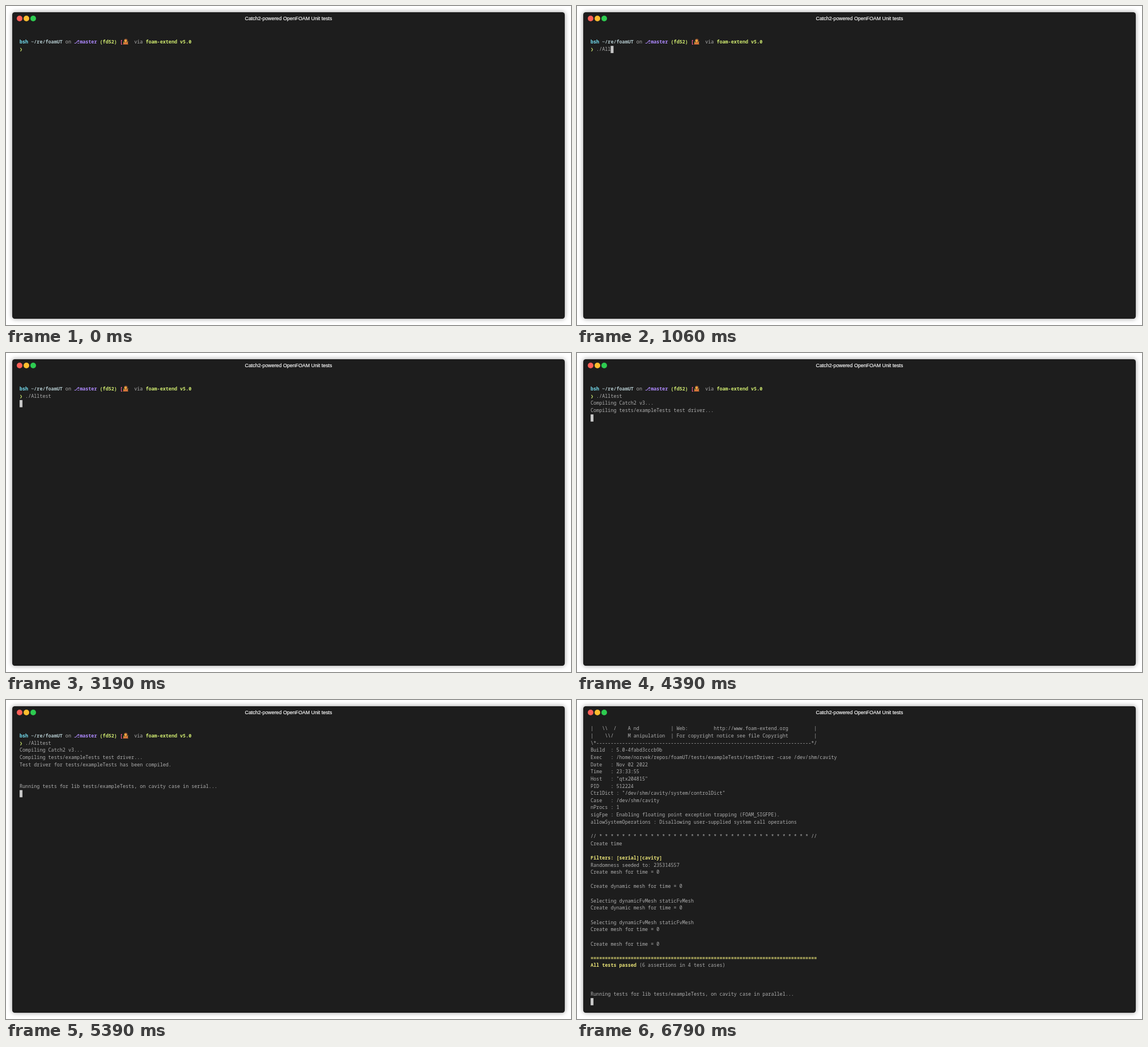
Recreate the animation shown at these times as an HTML page. Size 997 by 562 pixels, loop 8 s.

```html
<!DOCTYPE html>
<html lang="en">
<head>
<meta charset="utf-8">
<title>Unit tests terminal</title>
<style>
  html, body { margin: 0; width: 100%; height: 100%; overflow: hidden; background: #fff; }
  #window {
    position: absolute; left: 11px; top: 11px; width: 975px; height: 540px;
    border-radius: 4.5px; background: #1d1d1d; box-shadow: 0 0 8.4px rgba(0, 0, 0, .4);
  }
  .button { position: absolute; top: 17px; width: 10px; height: 10px; border-radius: 50%; }
  /* Title and terminal are laid out at full size and scaled down as a whole. */
  #title, #screen { position: absolute; transform: scale(.4212); white-space: pre; }
  #title {
    left: 0; top: 7px; width: 997px; text-align: center;
    font: 21px/30px "Liberation Sans", Arial, sans-serif; color: #fff;
    -webkit-text-stroke: .4px #fff;
  }
  #screen {
    left: 23.9px; top: 45.15px; width: 2280px; transform-origin: 0 0;
    font: 20px/30px "Noto Sans Mono", "DejaVu Sans Mono", monospace;
    font-variant-ligatures: none; color: #afafaf;
  }
  .row { height: 30px; }
  .row > span { position: relative; top: -2px; }
  b { font-weight: 700; }
  .blue { color: #75dff2; }
  .cyan { color: #b1c6ca; }
  .magenta { color: #ae89fe; }
  .green { color: #d0eb70; }
  .red { color: #ff6098; }
  .yellow { color: #ebe578; }
  .cell { display: inline-block; height: 30px; vertical-align: top; font-style: normal; }
  .branch { width: 24px; font-family: "DejaVu Sans", sans-serif; }
  .chevron { width: 12px; font-family: "DejaVu Sans Mono", monospace; }
  .cursor { width: 12px; background: #c7c7c7; }
</style>
</head>
<body>
<div id="window"></div>
<i class="button" style="left:19.4px;background:#ff5f58"></i>
<i class="button" style="left:31.4px;background:#ffbd2e"></i>
<i class="button" style="left:43.3px;background:#2dcb50"></i>
<div id="title">Catch2-powered OpenFOAM Unit tests</div>
<div id="screen"></div>
<script>
const LOOP = 8000, ROWS = 39;
const screenBox = document.getElementById('screen');
const bold = (color, text) => `<b class="${color}">${text}</b>`;
const banner = (left, right) => `| ${left.padEnd(26)}| ${right.padEnd(48)}|`;

const shrug = `<svg class="cell" width="24" height="30" viewBox="0 0 24 30">
<path d="M1 26Q2 15 12 16Q22 15 23 26Z" fill="#d9773a"/>
<path d="M1 13l5 3-2 5z" fill="#9aa84c"/><path d="M23 12l-5 4 3 5z" fill="#e9a23b"/>
<circle cx="13" cy="9" r="7.5" fill="#7a4630"/><circle cx="12" cy="11" r="5.5" fill="#f0a63c"/></svg>`;

const prompt =
  bold('blue', 'bsh') + ' ' + bold('cyan', '~/re/foamUT') + ' on ' +
  bold('magenta', '<i class="cell branch">⎇</i>master') + ' ' +
  bold('green', '(fd52)') + ' ' + bold('red', '[') + shrug + '  via ' +
  bold('green', 'foam-extend v5.0');
const command = typed => bold('green', '<i class="cell chevron">❯</i>') + ' ' + typed;

const compiling = ['Compiling Catch2 v3...', 'Compiling tests/exampleTests test driver...'];
const compiled = ['Test driver for tests/exampleTests has been compiled.'];
const running = mode => ['', '', `Running tests for lib tests/exampleTests, on cavity case in ${mode}...`];

const report = passColor => [
  '/*' + '-'.repeat(75) + '*\\',
  banner('=========', ''),
  banner(String.raw`\\      /  F ield`, 'foam-extend: Open Source CFD'),
  banner(String.raw` \\    /   O peration`, 'Version:     5.0'),
  banner(String.raw`  \\  /    A nd`, 'Web:         http://www.foam-extend.org'),
  banner(String.raw`   \\/     M anipulation`, 'For copyright notice see file Copyright'),
  '\\*' + '-'.repeat(75) + '*/',
  'Build  : 5.0-4fabd3cccb9b',
  'Exec   : /home/norvek/repos/foamUT/tests/exampleTests/testDriver -case /dev/shm/cavity',
  'Date   : Nov 02 2022',
  'Time   : 23:33:55',
  'Host   : "qtx204815"',
  'PID    : 512224',
  'CtrlDict : "/dev/shm/cavity/system/controlDict"',
  'Case   : /dev/shm/cavity',
  'nProcs : 1',
  'sigFpe : Enabling floating point exception trapping (FOAM_SIGFPE).',
  'allowSystemOperations : Disallowing user-supplied system call operations',
  '',
  '// ' + '* '.repeat(37) + '//',
  'Create time',
  '',
  bold('yellow', 'Filters: [serial][cavity]'),
  'Randomness seeded to: 235314557',
  'Create mesh for time = 0',
  '',
  'Create dynamic mesh for time = 0',
  '',
  'Selecting dynamicFvMesh staticFvMesh',
  'Create dynamic mesh for time = 0',
  '',
  'Selecting dynamicFvMesh staticFvMesh',
  'Create mesh for time = 0',
  '',
  'Create mesh for time = 0',
  '',
  bold(passColor, '='.repeat(79)),
  bold(passColor, 'All tests passed') + ' (6 assertions in 4 test cases)',
  ''
];

// Keystrokes: time and the command typed so far.
const keys = [
  [0, ''], [300, '.'], [480, './'], [650, './A'], [920, './Al'], [1060, './All'],
  [2460, './Allt'], [2700, './Allte'], [2790, './Alltest']
];

function linesAt(t) {
  const typed = keys.filter(([start]) => t >= start).pop()[1];
  const lines = ['', prompt, command(typed)];
  if (t >= 3190) lines.push('');
  if (t >= 4390) lines.splice(-1, 0, ...compiling);
  if (t >= 4890) lines.splice(-1, 0, ...compiled);
  if (t >= 5390) lines.splice(-1, 0, ...running('serial'));
  if (t >= 6290) lines.splice(-1, 0, ...report(t < 6790 ? 'green' : 'yellow'));
  if (t >= 6790) lines.splice(-1, 0, ...running('parallel'));
  return lines.slice(-ROWS);
}

function render(t) {
  const rows = linesAt(t).map(line => `<span>${line}</span>`);
  if (t >= 300) rows.push(rows.pop() + '<i class="cell cursor"></i>');
  return rows.map(row => `<div class="row">${row}</div>`).join('');
}

let shown = '';
function draw() {
  const html = render(performance.now() % LOOP);
  if (html !== shown) screenBox.innerHTML = shown = html;
  requestAnimationFrame(draw);
}
draw();
</script>
</body>
</html>
```
